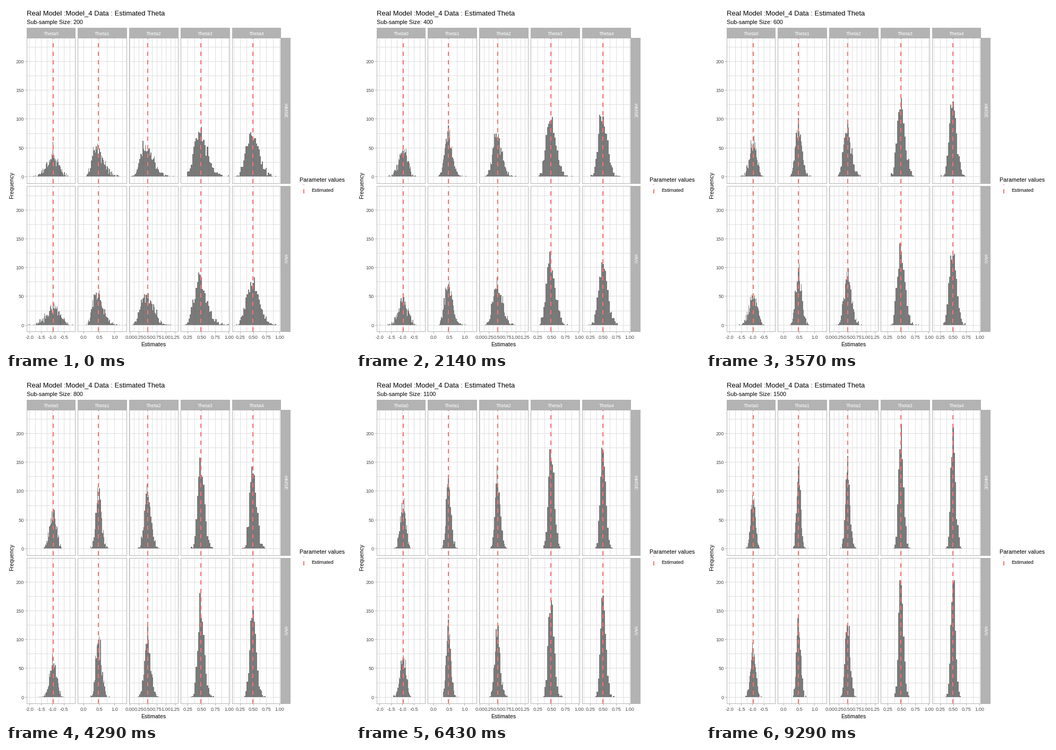
A matplotlib script for the animation above (10000 ms loop, 648x648 px).

```python
import numpy as np
import matplotlib.pyplot as plt
from matplotlib.animation import FuncAnimation
from matplotlib.collections import PolyCollection
from matplotlib.patches import Rectangle

W = 648
DPI = 100
SIZES = range(200, 1501, 100)
LOOP = 10000
BIN = 0.0225          # histogram bin width
DRAWS = 1000          # estimates per histogram
Y_SCALE = 1.084       # pixels per count

GRID, FRAME, TICK_TEXT = "#DEDEDE", "#B3B3B3", "#4D4D4D"
BAR, RED = "#595959", "#F8766D"

# Standard normal draws for every size, row and column, fixed once.
rng = np.random.default_rng(7)
NORMALS = rng.standard_normal((len(SIZES), 2, 5, DRAWS))

plt.rcParams["font.family"] = "Liberation Sans"
fig = plt.figure(figsize=(W / DPI, W / DPI), dpi=DPI, facecolor="white")
ax = fig.add_axes([0, 0, 1, 1])
ax.set_xlim(0, W)
ax.set_ylim(W, 0)
ax.axis("off")

# zero: pixel of value 0, unit: pixels per 1, spread: sd * sqrt(n) per row
PANELS = [
    dict(x0=39, x1=130, zero=131.3, unit=43.4, step=0.5, ticks=(-4, -1),
         dec=1, line=88, mean=-0.985, spread=(3.9, 4.25), skew=-0.04),
    dict(x0=135, x1=227, zero=146.4, unit=58.5, step=0.5, ticks=(0, 2),
         dec=1, line=173, mean=0.485, spread=(2.55, 2.5), skew=0.09),
    dict(x0=232, x1=324, zero=233.3, unit=68.3, step=0.25, ticks=(0, 5),
         dec=2, line=266, mean=0.495, spread=(2.5, 2.55), skew=0.09),
    dict(x0=329, x1=421, zero=317.0, unit=102.8, step=0.25, ticks=(1, 4),
         dec=2, line=366, mean=0.495, spread=(1.72, 1.7), skew=0.10),
    dict(x0=426, x1=517, zero=416.7, unit=98.7, step=0.25, ticks=(1, 4),
         dec=2, line=464, mean=0.495, spread=(1.72, 1.68), skew=0.08),
]
# top, bottom, pixel of zero count, name
ROWS = [(60, 334, 321.4, "mMSE"), (339, 613, 601.1, "mVc")]


def box(x0, y0, x1, y1, color, z=1):
    ax.add_patch(Rectangle((x0, y0), x1 - x0, y1 - y0, facecolor=color,
                           linewidth=0, antialiased=False, zorder=z))


def label(x, y, s, px, color="black", ha="left", **kw):
    kw.setdefault("va", "baseline")
    return ax.text(x, y, s, fontsize=px * 72 / DPI, color=color, ha=ha,
                   zorder=6, **kw)


def dashes(x, top, bottom):
    y = bottom
    while y > top:
        box(x, max(y - 8, top), x + 2, y, RED, z=4)
        y -= 16


def draw_panel(p, top, bottom, base):
    x0, x1 = p["x0"], p["x1"]
    for k in range(-20, 21):
        x = int(p["zero"] + k * p["step"] / 2 * p["unit"])
        if x0 < x < x1:
            box(x, top, x + 1, bottom, GRID)
    for v in range(0, 226, 25):
        y = int(base - v * Y_SCALE)
        box(x0, y, x1, y + 1, GRID)
    dashes(p["line"], top, bottom)
    box(x0, top, x0 + 1, bottom + 1, FRAME, 5)
    box(x1, top, x1 + 1, bottom + 1, FRAME, 5)
    box(x0, top, x1 + 1, top + 1, FRAME, 5)
    box(x0, bottom, x1 + 1, bottom + 1, FRAME, 5)


def draw_static():
    label(39, 17, "Real Model :Model_4 Data : Estimated Theta", 13.05)
    for i, p in enumerate(PANELS):
        box(p["x0"], 41, p["x1"] + 1, 61, FRAME)
        label((p["x0"] + p["x1"] + 1) / 2, 55, f"Theta{i}", 9.1, "white",
              "center")
        for top, bottom, base, _ in ROWS:
            draw_panel(p, top, bottom, base)
        first, last = p["ticks"]
        for k in range(first, last + 1):
            v = k * p["step"]
            x = p["zero"] + v * p["unit"]
            box(int(x), 614, int(x) + 1, 617, FRAME)
            label(x, 627, f"{v:.{p['dec']}f}", 9.1, TICK_TEXT, "center")
    for top, bottom, base, name in ROWS:
        box(518, top, 536, bottom + 1, FRAME)
        label(525.5, (top + bottom) / 2, name, 9.3, "white", "center",
              va="center", rotation=270)
        for v in range(0, 201, 50):
            y = int(base - v * Y_SCALE)
            box(36, y, 39, y + 1, FRAME)
            label(34, y + 4, str(v), 9.1, TICK_TEXT, "right")
    label(278, 641, "Estimates", 10.6, ha="center")
    label(11.5, 338, "Frequency", 10.6, ha="center", va="center", rotation=90)
    label(553, 331, "Parameter values", 10.75)
    dashes(560, 336, 353)
    label(575, 350, "Estimated", 9.4)


def bars(i, row, col):
    """Rectangles of one histogram of estimates at step i."""
    p, n, z = PANELS[col], SIZES[i], NORMALS[i, row, col]
    skew = p["skew"] * np.sqrt(200 / n)
    est = p["mean"] + p["spread"][row] / np.sqrt(n) * (z + skew * (z * z - 1))
    bins, counts = np.unique(np.round(est / BIN), return_counts=True)
    base = ROWS[row][2]
    floor = int(base)
    out = []
    for b, c in zip(bins, counts):
        left = round(p["zero"] + (b - 0.5) * BIN * p["unit"])
        right = round(p["zero"] + (b + 0.5) * BIN * p["unit"])
        right = max(right, left + 1)
        if left <= p["x0"] or right > p["x1"]:
            continue
        y = min(round(base - c * Y_SCALE), floor - 1)
        out.append([(left, floor), (left, y), (right, y), (right, floor)])
    return out


draw_static()
subtitle = label(39, 34, "", 10.75)
hist = PolyCollection([], facecolors=BAR, alpha=0.8, linewidths=0,
                      antialiaseds=False, zorder=3)
ax.add_collection(hist, autolim=False)


def update(i):
    subtitle.set_text(f"Sub-sample Size: {SIZES[i]}")
    hist.set_verts([r for row in range(2) for col in range(5)
                    for r in bars(i, row, col)])
    return hist, subtitle


anim = FuncAnimation(fig, update, frames=len(SIZES),
                     interval=LOOP / len(SIZES), repeat=True, repeat_delay=0)
plt.show()
```
